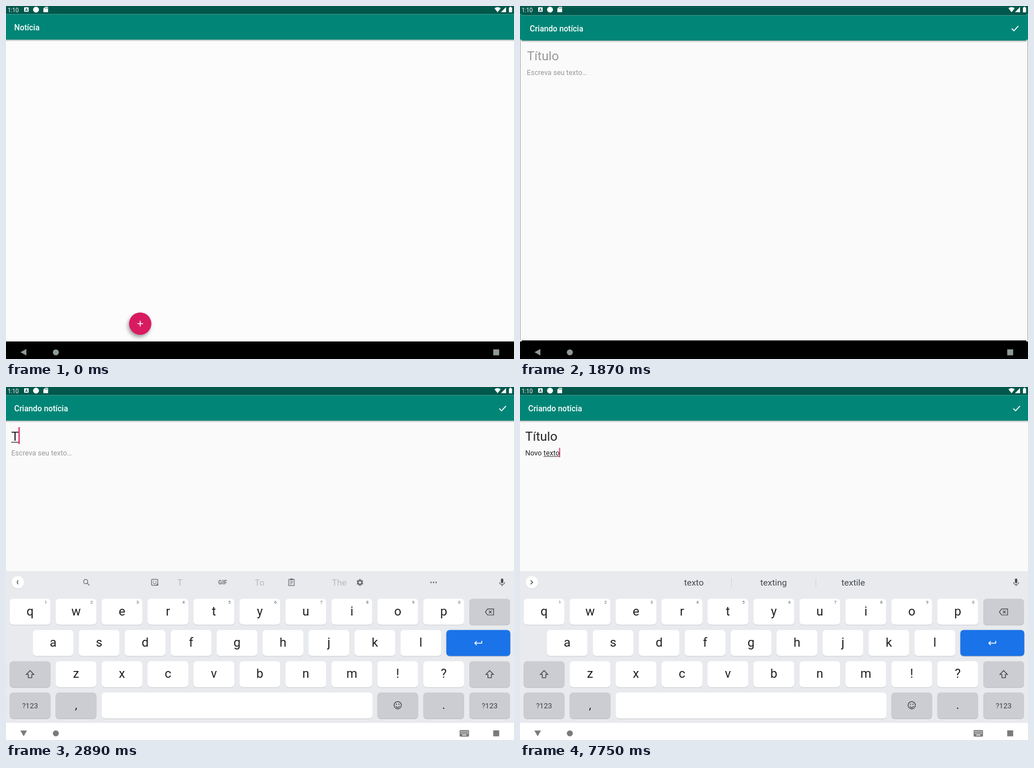
Write an HTML page with a canvas that moves like this. It is 897 px wide and 624 px high and loops after 8000 ms.

```html
<!DOCTYPE html>
<html lang="pt">
<head>
<meta charset="utf-8">
<title>Criando notícia</title>
<style>
  html, body { margin: 0; width: 100%; height: 100%; overflow: hidden; background: #000; }
  canvas { display: block; }
</style>
</head>
<body>
<canvas id="c" width="897" height="624"></canvas>
<script>
const c = document.getElementById('c').getContext('2d');
const W = 897, H = 624, LOOP = 8000, LAG = 140;
const TEAL = '#008577', DARK = '#00574b', PINK = '#d81b60', INK = '#4b4f55';
const FONT = 'Roboto, "Noto Sans", sans-serif';
const HINT = ['Título', 'Escreva seu texto…'];

// [time, text] for each field
const TITLE = [[0, ''], [2710, 'T'], [3540, 'Tí'], [3640, 'Tít'], [3880, 'Títl'],
  [4260, 'Tít'], [4420, 'Títu'], [4560, 'Títul'], [4660, 'Título']];
const BODY = [[0, ''], [5760, 'N'], [6020, 'No'], [6230, 'Nov'], [6290, 'Novo'],
  [6370, 'Novo '], [6770, 'Novo t'], [6830, 'Novo te'], [7330, 'Novo tex'],
  [7540, 'Novo text'], [7610, 'Novo texto']];
const WORDS = [[0, ''], [2850, 'T To The'], [3680, ''], [5880, 'N No Not'],
  [6210, 'No Not Now'], [6370, 'Novo Nope Nov'], [6510, 'the and another'],
  [6830, 't the to'], [7000, 'te the ten'], [7610, 'tex text texts'],
  [7740, 'texto texting textile']];
const OPEN = 1663, SHOWN = 1730, FOCUS = 2170, KEYS = 2440, SWITCH = 5340;

const clamp = v => Math.max(0, Math.min(1, v));
const ramp = (t, a, d) => clamp((t - a) / d);
const at = (list, t) => list.filter(e => e[0] <= t).pop() || list[0];
const bez = (u, p) => {
  const v = 1 - u;
  return v * v * v * p[0] + 3 * v * v * u * p[1] + 3 * v * u * u * p[2] + u * u * u * p[3];
};

// fast start, very slow finish, in two curve pieces
function extraSlow(x) {
  const first = x < 1 / 6;
  const px = first ? [0, .05, .1333, 1 / 6] : [1 / 6, .2083, .25, 1];
  const py = first ? [0, 0, .06, .4] : [.4, .82, 1, 1];
  let lo = 0, hi = 1;
  for (let i = 0; i < 20; i++) {
    const m = (lo + hi) / 2;
    if (bez(m, px) < x) lo = m; else hi = m;
  }
  return bez(lo, py);
}

function box(x, y, w, h, fill) { c.fillStyle = fill; c.fillRect(x, y, w, h); }
function rbox(x, y, w, h, r, fill) {
  c.beginPath(); c.roundRect(x, y, w, h, r); c.fillStyle = fill; c.fill();
}
function disc(x, y, r, fill) {
  c.beginPath(); c.arc(x, y, r, 0, 7); c.fillStyle = fill; c.fill();
}
function ring(x, y, r, a = 0, b = 7) { c.beginPath(); c.arc(x, y, r, a, b); c.stroke(); }
function path(...p) {
  c.beginPath();
  for (let i = 0; i < p.length; i += 2) c.lineTo(p[i], p[i + 1]);
}
function line(...p) { path(...p); c.stroke(); }
function poly(fill, ...p) { path(...p); c.closePath(); c.fillStyle = fill; c.fill(); }
function pen(color, w) { c.strokeStyle = color; c.lineWidth = w; }
function text(s, x, y, size, fill, align = 'left', weight = 400) {
  c.font = `${weight} ${size}px ${FONT}`;
  c.textAlign = align;
  c.fillStyle = fill;
  c.fillText(s, x, y);
}
function group(x, y, draw) { c.save(); c.translate(x, y); draw(); c.restore(); }

function status() {
  text('1:10', 3, 10.5, 10, '#fff');
  rbox(32, 2.3, 8, 8, 1, '#fff');
  text('A', 36, 9, 7, DARK, 'center', 700);
  disc(53, 6.4, 5.2, '#fff');
  poly('#fff', 69, 1.5, 74.3, 1.5, 74.3, 11, 66, 11, 66, 4.5);
  pen(DARK, .9);
  for (let i = 0; i < 3; i++) line(69.4 + i * 1.7, 2.8, 69.4 + i * 1.7, 4.6);
  c.beginPath();
  c.moveTo(868, 11); c.lineTo(862.4, 4); c.quadraticCurveTo(868, -.2, 873.6, 4);
  c.fillStyle = '#fff'; c.fill();
  poly('#fff', 883, 1.8, 883, 11, 874, 11);
  rbox(888, 2.4, 5.6, 8.8, .8, '#fff');
  box(889.6, 1.3, 2.4, 1.6, '#fff');
}

function page(title, bg) {
  box(0, 0, W, H, bg);
  const g = c.createLinearGradient(0, 59, 0, 63);
  g.addColorStop(0, 'rgba(0,0,0,.28)');
  g.addColorStop(1, 'rgba(0,0,0,0)');
  box(0, 59, W, 4, g);
  box(0, 0, W, 14.5, DARK);
  box(0, 14.5, W, 45, TEAL);
  text(title, 14.5, 43, 14, '#fff', 'left', 500);
  box(0, 593, W, 31, '#000');
}

function home(t) {
  page('Notícia', '#fcfcfc');
  const lift = ramp(t, 1360, 80) * (1 - ramp(t, 1470, 100));
  c.save();
  c.shadowColor = 'rgba(0,0,0,.36)';
  c.shadowBlur = 6 + 4 * lift;
  c.shadowOffsetX = -2;
  c.shadowOffsetY = 4 + 2 * lift;
  disc(237, 561.5, 19.7, PINK);
  c.restore();
  if (t >= 1370 && t < 1570) {
    const k = ramp(t, 1370, 160);
    c.save();
    c.beginPath(); c.arc(237, 561.5, 19.7, 0, 7); c.clip();
    c.globalAlpha = .2 * (1 - ramp(t, 1460, 110));
    disc(245 - 8 * k, 558 + 3.5 * k, 13.5 + 12 * k, '#301050');
    c.restore();
  }
  pen('#fff', 1.5);
  line(232, 561.5, 242, 561.5);
  line(237, 556.5, 237, 566.5);
}

function field(t, list, hint, x, y, size, active) {
  const [when, s] = at(list, t);
  text(s || hint, x, y, size, s ? '#252525' : '#999');
  if (!active) return;
  const big = size > 20;
  const wide = str => c.measureText(str).width;
  const start = s.lastIndexOf(' ') + 1;
  const old = at(list, t - LAG)[1];
  const from = Math.min(old.lastIndexOf(' ') + 1, start);
  const end = Math.min(old.length, s.length);
  const x0 = x + wide(s.slice(0, from)), x1 = x + wide(s.slice(0, end));
  if (x1 > x0) box(x0, big ? 97 : 122.3, x1 - x0, big ? 1.3 : 1, '#333');
  const since = t - Math.max(when, big ? FOCUS : SWITCH);
  if (Math.floor(since / 490) % 2 === 0) {
    box(x + wide(s) - .5, big ? 71 : 107.5, big ? 2 : 1.5, big ? 30 : 16.5, PINK);
  }
}

function editor(t) {
  page('Criando notícia', '#fafafa');
  pen('#fff', 1.7);
  line(871, 38, 875, 42, 882.8, 33.6);
  field(t, TITLE, HINT[0], 9.3, 95, 22.4, t >= FOCUS && t < SWITCH);
  field(t, BODY, HINT[1], 9.2, 121, 12.6, t >= SWITCH);
}

function tools() {
  pen(INK, 1.5);
  ring(140.7, 344, 3.7);
  line(143.4, 346.7, 147.3, 350.6);
  c.beginPath(); c.roundRect(257, 340, 11, 10.6, 1.5); c.stroke();
  poly(INK, 268.5, 347, 268.5, 351, 264, 351);
  disc(260.5, 343.7, .9, INK); disc(264.7, 343.7, .9, INK);
  pen(INK, 1.1); ring(262.5, 345, 2.8, .2, 2.9);
  text('GIF', 382.5, 349, 10, INK, 'center', 900);
  pen(INK, 1.4); c.strokeRect(499.3, 340.2, 9.6, 10.8);
  rbox(501.6, 338.5, 5, 3, 1, INK);
  pen(INK, 1.1);
  for (let i = 0; i < 3; i++) line(501.5, 343.7 + i * 2.2, 506.8 - (i > 1 ? 2 : 0), 343.7 + i * 2.2);
  pen(INK, 2.8); ring(625, 345.5, 3.4);
  for (let i = 0; i < 6; i++) {
    group(625, 345.5, () => { c.rotate(i * Math.PI / 3); box(-1.5, -6, 3, 2.5, INK); });
  }
  for (let i = -1; i < 2; i++) disc(755 + i * 4.5, 345.5, 1.4, INK);
}

function strip(t) {
  const [when, s] = at(WORDS, t);
  const before = at(WORDS, when - 1)[1];
  const swap = when && !s !== !before;
  const k = swap ? ramp(t, when, 140) : 1;
  const mix = s ? k : 1 - k;
  disc(21, 346, 11.2, '#d5d7da');
  disc(21, 345.3, 11, '#fff');
  pen('#44484d', 1.4);
  const d = (2 * mix - 1) * 2;
  line(20.5 - d, 341.8, 20.5 + d, 345.3, 20.5 - d, 348.8);
  c.globalAlpha = 1 - mix;
  if (mix < 1) tools();
  c.globalAlpha = mix;
  if (mix > 0) {
    (s || before).split(' ').forEach((w, i) => text(w, 307 + i * 140.7, 351.3, 15.5, '#44484d', 'center'));
    box(373, 338, 1, 15.5, '#cfd1d4');
    box(522, 338, 1, 15.5, '#cfd1d4');
  }
  c.globalAlpha = 1;
  rbox(873.9, 338.5, 4.2, 8.4, 2.1, INK);
  pen(INK, 1.2);
  ring(876, 345, 4.4, 0, Math.PI);
  line(876, 349.4, 876, 352);
}

function key(x, y, w, fill = '#fff') {
  rbox(x, y + 1, w, 46, 6, fill === '#fff' ? '#c9cbcf' : '#babcc1');
  rbox(x, y, w, 46, 6, fill);
}

function shift(x, y, full) {
  group(x, y, () => {
    path(0, -6.5, 6.6, .3, 3.1, .3, 3.1, 6, -3.1, 6, -3.1, .3, -6.6, .3);
    c.closePath();
    pen('#3c4043', 1.3); c.stroke();
    if (full) { c.fillStyle = '#3c4043'; c.fill(); }
  });
}

function keyboard(t) {
  const GREY = '#cccdd2', STEP = 81.15, KW = 72;
  const caps = t >= 5660 && t < 5820;
  const X = i => 6.5 + i * STEP;
  const rowY = i => 374.2 + i * 55.3;
  box(0, 325.5, W, 268.5, '#e8eaed');
  box(0, 593.8, W, 120, '#fff');
  strip(t);
  const row = (letters, x, r) => [...letters].forEach((ch, i) => {
    key(x + i * STEP, rowY(r), KW);
    text(caps ? ch.toUpperCase() : ch, x + i * STEP + 36, rowY(r) + 29.5, 22, '#1d1e20', 'center');
    if (r === 0) text((i + 1) % 10, X(i) + 63.5, 382.7, 7.5, '#55585c', 'center');
  });
  row('qwertyuiop', X(0), 0);
  row('asdfghjkl', 47.3, 1);
  row('zxcvbnm!?', X(1), 2);

  key(X(10), rowY(0), KW, GREY);
  pen('#3c4043', 1.2);
  path(846.5, 397.7, 850.3, 392.4, 861, 392.4, 861, 403, 850.3, 403);
  c.closePath(); c.stroke();
  line(852.6, 395.2, 857.6, 400.2);
  line(857.6, 395.2, 852.6, 400.2);

  key(777.5, rowY(1), 113, '#1a73e8');
  pen('#fff', 1.5);
  line(840, 448.7, 840, 452.7, 828, 452.7);
  line(831.2, 449.3, 827.8, 452.7, 831.2, 456.1);

  for (const i of [0, 10]) {
    key(X(i), rowY(2), KW, GREY);
    shift(X(i) + 36, 507.8, caps);
    key(X(i), rowY(3), KW, GREY);
    text('?123', X(i) + 36, 567.6, 13, '#3c4043', 'center');
  }
  for (const i of [1, 8, 9]) key(X(i), rowY(3), KW, GREY);
  text(',', X(1) + 36, 569, 20, '#1d1e20', 'center');
  text('.', X(9) + 36, 569, 20, '#1d1e20', 'center');
  key(X(2), rowY(3), 478.5);
  pen('#3c4043', 1.3);
  ring(691.7, 562.6, 6.4);
  disc(689.5, 560.8, 1, '#3c4043');
  disc(693.9, 560.8, 1, '#3c4043');
  ring(691.7, 563.4, 3.2, .2, 2.94);
}

function nav(t) {
  const on = t >= KEYS;
  const col = on ? '#7a7a7a' : '#8e9a97';
  c.globalAlpha = on ? .25 + .75 * ramp(t, 2500, 240) : 1;
  group(31.2, 612, () => {
    c.rotate(-Math.PI / 2 * ramp(t, 2560, 150));
    poly(col, -5.6, 0, 4.8, -5.8, 4.8, 5.8);
  });
  disc(88, 612.2, 5.3, col);
  box(860.3, 607, 10.5, 10.5, col);
  if (on) {
    rbox(801, 606.5, 16.5, 11.5, 1.2, col);
    for (let i = 0; i < 10; i++) box(802.8 + i % 5 * 2.8, 608.5 + Math.floor(i / 5) * 2.8, 1.5, 1.5, '#fff');
    box(805.5, 614.4, 7.5, 1.5, '#fff');
  }
  c.globalAlpha = 1;
}

function draw(t) {
  c.setTransform(1, 0, 0, 1, 0, 0);
  c.clearRect(0, 0, W, H);
  if (t < 1950) home(t);
  if (t >= SHOWN) {
    const moving = t < 1950;
    c.save();
    if (moving) {
      const s = .85 + .15 * extraSlow(ramp(t, OPEN, 400));
      c.globalAlpha = ramp(t, OPEN + 35, 50);
      c.translate(W / 2, H / 2);
      c.scale(s, s);
      c.translate(-W / 2, -H / 2);
    }
    editor(t);
    c.restore();
    if (moving) {
      box(0, 61, 1, 530, 'rgba(0,0,0,.35)');
      box(W - 1, 61, 1, 530, 'rgba(0,0,0,.35)');
    }
  }
  if (t >= KEYS) {
    c.save();
    // fade by slide-in: the panel is opaque once it is near its place
    const left = 1 - ramp(t, KEYS, 260);
    c.translate(0, 62 * left ** 3);
    keyboard(t);
    c.restore();
  }
  status();
  nav(t);
}

function tick() {
  draw(performance.now() % LOOP);
  requestAnimationFrame(tick);
}
tick();
</script>
</body>
</html>
```
